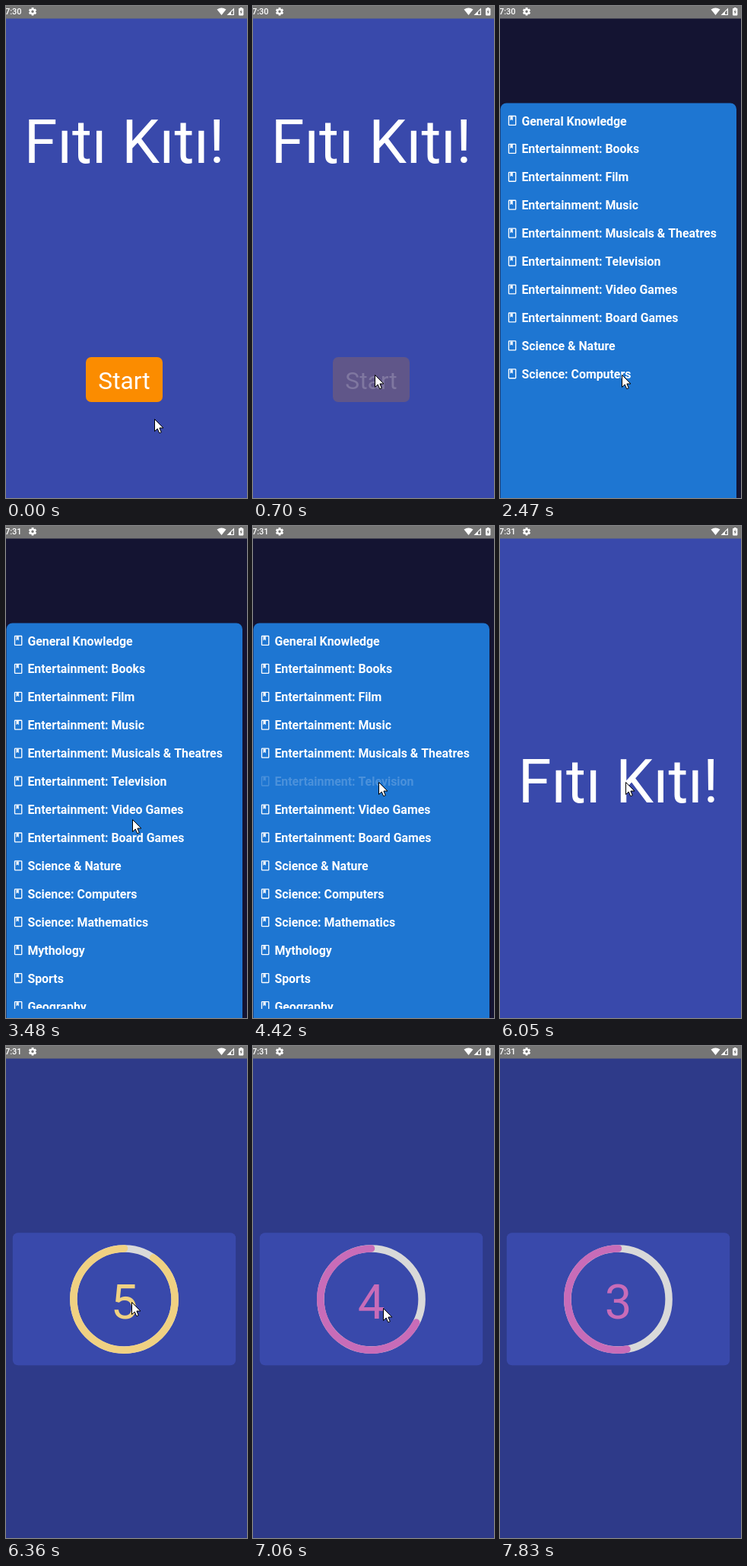
These frames come from a looping animation (317 by 646 pixels, 8 s). An HTML page with a canvas:

```html
<!DOCTYPE html>
<html lang="en">
<head>
<meta charset="utf-8">
<title>Quiz app</title>
<style>
  html, body { margin: 0; width: 100%; height: 100%; overflow: hidden; background: #3949ab; }
  canvas { display: block; width: 317px; height: 646px; }
</style>
</head>
<body>
<canvas id="stage" width="317" height="646"></canvas>
<script>
const W = 317, H = 646, LOOP = 8000, CENTER = 155.5;
const INDIGO = '#3949ab';
const TITLE = 'Fıtı Kıtı!';
const TOPICS = [
  'General Knowledge', 'Entertainment: Books', 'Entertainment: Film', 'Entertainment: Music',
  'Entertainment: Musicals & Theatres', 'Entertainment: Television', 'Entertainment: Video Games',
  'Entertainment: Board Games', 'Science & Nature', 'Science: Computers',
  'Science: Mathematics', 'Mythology', 'Sports', 'Geography'
];
const PRESSED_TOPIC = 5;
const ctx = document.getElementById('stage').getContext('2d');

const clamp = (v, lo, hi) => Math.min(hi, Math.max(lo, v));
const mix = (a, b, p) => a + (b - a) * p;
const easeInOut = p => p * p * (3 - 2 * p);

// Progress 0..1 in discrete steps; the first step lands at start, the last at end.
function stepped(t, start, end, count) {
  if (t < start) return 0;
  return clamp(Math.floor((t - start) / (end - start) * (count - 1) + 1.001), 0, count) / count;
}

function box(x, y, w, h, r, color) {
  ctx.fillStyle = color;
  ctx.beginPath();
  ctx.roundRect(x, y, w, h, r);
  ctx.fill();
}

function text(str, x, y, size, { color = '#fff', weight = 400, align = 'center' } = {}) {
  ctx.font = `${weight} ${size}px Roboto, sans-serif`;
  ctx.textAlign = align;
  ctx.fillStyle = color;
  ctx.fillText(str, x, y);
}

function shape(points, color) {
  ctx.beginPath();
  points.forEach(([x, y]) => ctx.lineTo(x, y));
  ctx.closePath();
  ctx.fillStyle = color;
  ctx.fill();
}

function background(color) {
  ctx.fillStyle = color;
  ctx.fillRect(0, 0, W, H);
}

function statusBar(t) {
  const grey = '#757575';
  ctx.fillStyle = grey;
  ctx.fillRect(0, 0, W, 16.5);
  text(t < 3400 ? '7:30' : '7:31', 20.6, 11.3, 11, { weight: 500, align: 'right' });

  // gear
  ctx.save();
  ctx.translate(35, 7.3);
  ctx.fillStyle = '#fff';
  for (let i = 0; i < 6; i++) {
    ctx.rotate(Math.PI / 3);
    ctx.fillRect(-1.4, -5.2, 2.8, 3);
  }
  ctx.beginPath();
  ctx.arc(0, 0, 3.9, 0, 7);
  ctx.fill();
  ctx.fillStyle = grey;
  ctx.beginPath();
  ctx.arc(0, 0, 1.7, 0, 7);
  ctx.fill();
  ctx.restore();

  // wifi
  ctx.fillStyle = '#fff';
  ctx.beginPath();
  ctx.moveTo(283.5, 12);
  ctx.lineTo(277.5, 4.6);
  ctx.quadraticCurveTo(283.5, 0.6, 289.5, 4.6);
  ctx.fill();

  // signal
  shape([[300, 2.5], [300, 12], [290.5, 12]], '#fff');
  shape([[298.8, 5.3], [298.8, 10.9], [296, 10.9], [296, 8.1]], grey);

  // battery
  box(306, 3, 6.4, 9.4, 0.8, '#fff');
  ctx.fillRect(307.8, 2, 2.8, 1.5);
  shape([[309.7, 4.6], [307.5, 8.2], [308.9, 8.2], [308.7, 10.9], [310.9, 7.2], [309.5, 7.2]], grey);
}

function homeScreen(t) {
  background(INDIGO);
  text(TITLE, CENTER, 206, 79.2);
  ctx.globalAlpha = mix(1, 0.2, easeInOut(stepped(t, 530, 700, 3)));
  box(105, 461, 101, 59, 7, '#fb8c00');
  text('Start', CENTER, 503, 31.7);
  ctx.globalAlpha = 1;
}

function bookIcon(x, y) {
  ctx.save();
  ctx.translate(x, y);
  ctx.scale(0.66, 0.66);
  ctx.strokeStyle = '#fff';
  ctx.lineWidth = 2;
  ctx.beginPath();
  ctx.roundRect(5, 3, 14, 18, 1);
  ctx.stroke();
  shape([[8, 4], [13, 4], [13, 12], [10.5, 9.75], [8, 12]], '#fff');
  ctx.restore();
}

function topicScreen(t) {
  background(t < 5980 ? '#141432' : INDIGO);
  box(0.5, 127.5, 310.5, 540, 8, '#1e76d2');
  const count = t < 3010 ? 10 : TOPICS.length;
  const pressed = mix(1, 0.2, stepped(t, 4340, 4420, 2));
  ctx.save();
  ctx.beginPath();
  ctx.rect(0, 135, 311, 499);
  ctx.clip();
  TOPICS.slice(0, count).forEach((name, i) => {
    const y = 156.5 + i * 36.93;
    ctx.globalAlpha = i === PRESSED_TOPIC ? pressed : 1;
    bookIcon(8.2, y - 14);
    text(name, 28.4, y, 15.9, { weight: 700, align: 'left' });
  });
  ctx.restore();
}

function loadingScreen() {
  background(INDIGO);
  text(TITLE, CENTER, 363, 79.2);
}

// Elapsed part of the ring in degrees; it catches up after a slow start.
function elapsedAngle(t) {
  if (t < 6600) return 35;
  if (t < 6770) return 75;
  if (t < 6910) return 98;
  if (t < 7060) return 112;
  if (t < 7830) return mix(112, 159, stepped(t, 7060, 7690, 9));
  return 170;
}

function timerScreen(t) {
  background('#2e3a89');
  box(8.8, 245.3, 293.4, 174, 7, INDIGO);
  const angle = elapsedAngle(t);
  const fade = stepped(t, 6600, 6770, 2);
  const [r, g, b] = [[240, 200], [209, 108], [130, 184]].map(([from, to]) => Math.round(mix(from, to, fade)));
  const color = `rgb(${r}, ${g}, ${b})`;
  const top = -Math.PI / 2;

  ctx.lineWidth = 9.5;
  ctx.lineCap = 'round';
  ctx.strokeStyle = '#d9d9d9';
  ctx.beginPath();
  ctx.arc(CENTER, 332.5, 66.6, 0, Math.PI * 2);
  ctx.stroke();
  ctx.strokeStyle = color;
  ctx.beginPath();
  ctx.arc(CENTER, 332.5, 66.6, top + angle * Math.PI / 180, top + Math.PI * 2);
  ctx.stroke();
  ctx.lineCap = 'butt';

  text(Math.ceil(5 - angle / 72), CENTER, 358, 63.4, { color });
}

const MOVES = [
  { start: 70, end: 300, count: 4, to: [160, 484] },
  { start: 3010, end: 3800, count: 11, to: [170, 310] },
  { start: 3880, end: 4200, count: 5, to: [165, 336] },
  { start: 7060, end: 7690, count: 9, to: [340, 580] }
];

function cursor(t) {
  let pos = [195, 542];
  for (const { start, end, count, to } of MOVES) {
    const p = easeInOut(stepped(t, start, end, count));
    pos = pos.map((v, i) => mix(v, to[i], p));
  }
  ctx.save();
  ctx.translate(Math.round(pos[0]) + 0.5, Math.round(pos[1]) + 0.5);
  shape([[0, 0], [0, 16], [3.7, 12.5], [6.2, 18.2], [8.8, 17.2], [6.4, 11.5], [11.4, 11.5]], '#fff');
  ctx.strokeStyle = '#000';
  ctx.lineWidth = 1;
  ctx.lineJoin = 'round';
  ctx.stroke();
  ctx.restore();
}

function draw(t) {
  if (t < 2470) homeScreen(t);
  else if (t < 6050) topicScreen(t);
  else if (t < 6360) loadingScreen();
  else timerScreen(t);
  statusBar(t);
  cursor(t);
}

const began = performance.now();
function frame() {
  draw((performance.now() - began) % LOOP);
  requestAnimationFrame(frame);
}
frame();
</script>
</body>
</html>
```
